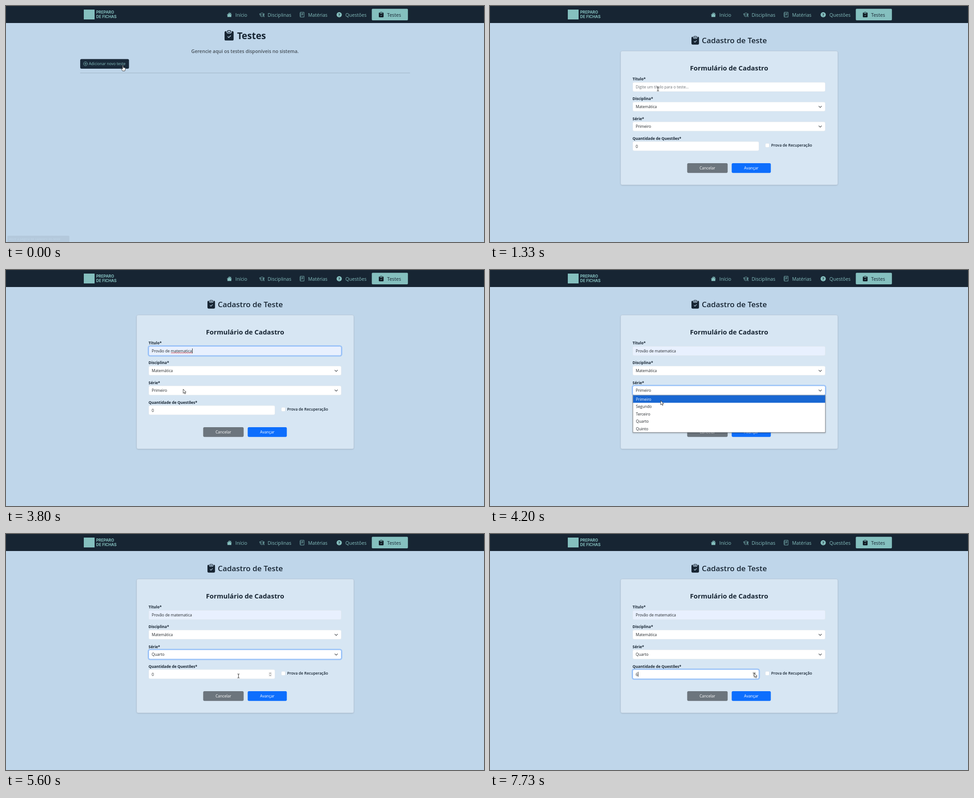
An HTML page that plays this animation: 1063 by 527 pixels, repeating every 8 s.

```html
<!DOCTYPE html>
<html lang="pt">
<head>
<meta charset="utf-8">
<title>Cadastro de Teste</title>
<style>
  html, body { margin: 0; width: 100%; height: 100%; overflow: hidden; background: #bfd6ea; }
  svg { display: block; width: 1063px; height: 527px; }
  text { font-family: 'Open Sans', 'Noto Sans', sans-serif; font-size: 8.57px; fill: #212529; white-space: pre; }
  .mid { text-anchor: middle; }
  .bold { font-weight: 700; fill: #172533; }
  .semi { font-weight: 600; fill: #172533; }
  .label { font-size: 8.42px; }
  .nav { font-size: 10.65px; fill: #85c0bf; }
  .brand { font-family: Inter, sans-serif; font-weight: 700; fill: #85c0bf; }
  .small { font-family: 'Liberation Sans', Arial, sans-serif; font-size: 7.1px; fill: #fff; }
  .light { fill: #fff; }
  .line { fill: none; stroke-linecap: round; stroke-linejoin: round; }
</style>
</head>
<body>
<svg viewBox="0 0 1063 527" xmlns="http://www.w3.org/2000/svg">
  <defs>
    <path id="clipboard" fill-rule="evenodd" d="M6.5 0A1.5 1.5 0 0 0 5 1.5v1A1.5 1.5 0 0 0 6.5 4h3A1.5 1.5 0 0 0 11 2.5v-1A1.5 1.5 0 0 0 9.5 0zM9.5 1a.5.5 0 0 1 .5.5v1a.5.5 0 0 1-.5.5h-3a.5.5 0 0 1-.5-.5v-1a.5.5 0 0 1 .5-.5zM4 1.5H3a2 2 0 0 0-2 2V14a2 2 0 0 0 2 2h10a2 2 0 0 0 2-2V3.5a2 2 0 0 0-2-2h-1v1A2.5 2.5 0 0 1 9.5 5h-3A2.5 2.5 0 0 1 4 2.5zM10.85 8.85l-3 3a.5.5 0 0 1-.7 0l-1.5-1.5a.5.5 0 0 1 .7-.7L7.5 10.8l2.65-2.65a.5.5 0 0 1 .7.7z"/>
    <filter id="shadow" x="-5%" y="-10%" width="110%" height="125%">
      <feDropShadow dx="0" dy="1.2" stdDeviation="1.4" flood-opacity=".28"/>
    </filter>
    <filter id="soft" x="-3%" y="-3%" width="106%" height="106%">
      <feDropShadow dx="0" dy="1" stdDeviation="1" flood-opacity=".14"/>
    </filter>
  </defs>

  <rect width="1063" height="527" fill="#bfd6ea"/>
  <rect width="1063" height="38" fill="#172533"/>
  <rect x="173" y="8" width="24" height="22" fill="#85c0bf"/>
  <text class="brand" x="200.5" y="17" font-size="10.3">PREPARO</text>
  <text class="brand" x="200.5" y="27" font-size="9.5">DE FICHAS</text>

  <g fill="#85c0bf">
    <path transform="translate(491 13.7) scale(.72)" d="M8 .9 15.6 8.5l-.9.8L8 2.6 1.3 9.3l-.9-.8zM11 2h2v5l-2-2zM8 3.6l6 6V15H2V9.6z"/>
    <circle cx="741" cy="19.5" r="5.8"/>
    <rect x="813.5" y="6.3" width="80.3" height="25.8" rx="2"/>
  </g>
  <g class="line" stroke="#85c0bf" stroke-width="1.2">
    <path transform="translate(563 13.8) scale(.74)" d="M8 2.5.8 5.6 8 8.9l7.2-3.3zM3.2 7.2v4L8 13.8l4.8-2.6v-4M14.4 6v6.5M13.5 14l.9-1.5.9 1.5"/>
    <path transform="translate(652.5 13.4) scale(.74)" d="M3 .8h11v14.4H3zM1.4 4.5H4M1.4 8H4M1.4 11.5H4M6.5 4.5H11M6.5 7H11M6.5 9.5H9"/>
  </g>
  <text class="bold mid" x="741" y="22.7" style="font-size:8.5px">?</text>
  <use href="#clipboard" transform="translate(828.4 13.3) scale(.75)" fill="#101a24"/>
  <text class="nav mid" x="523.3" y="23.7">Início</text>
  <text class="nav mid" x="608.2" y="23.7">Disciplinas</text>
  <text class="nav mid" x="693.3" y="23.7">Matérias</text>
  <text class="nav mid" x="778.3" y="23.7">Questões</text>
  <text class="nav mid" x="863" y="23.7" style="fill:#172533">Testes</text>

  <g id="listPage">
    <use href="#clipboard" transform="translate(484.6 54) scale(1.44)" fill="#172533"/>
    <text class="bold mid" x="546" y="74" style="font-size:20.6px">Testes</text>
    <text class="semi mid" x="531.5" y="105" style="font-size:10.55px;fill:#454f58">Gerencie aqui os testes disponíveis no sistema.</text>
    <rect x="165" y="118.5" width="108.5" height="21.5" rx="3" fill="#1a2a3a"/>
    <g class="line" stroke="#85c0bf" stroke-width=".8">
      <circle cx="176.8" cy="129" r="4.4"/>
      <path d="M174.6 129h4.4M176.8 126.8v4.4"/>
    </g>
    <text class="mid" x="225" y="132.3" style="fill:#85c0bf">Adicionar novo teste</text>
    <path d="M165 149.5H898.5" stroke="#a0b4c6"/>
  </g>
  <g id="status">
    <rect x="3" y="513" width="138" height="15" rx="1.5" fill="#3c4348"/>
    <text x="7" y="522.5" style="font-size:7px;fill:#c6d0d6">Abrir a página de cadastro do teste</text>
  </g>

  <g id="formPage">
    <use href="#clipboard" transform="translate(446.8 67) scale(1.2)" fill="#172533"/>
    <text class="semi mid" x="543.3" y="83" style="font-size:16.9px">Cadastro de Teste</text>
    <rect x="290.5" y="100.5" width="483" height="299" rx="3.5" fill="#d7e6f3" stroke="#b5c6d6" stroke-width=".8" filter="url(#soft)"/>
    <text class="bold mid" x="531.7" y="143.5" style="font-size:14.8px">Formulário de Cadastro</text>
    <text class="bold label" x="317" y="166">Título*</text>
    <text class="bold label" x="317" y="210.3">Disciplina*</text>
    <text class="bold label" x="317" y="254.5">Série*</text>
    <text class="bold label" x="317" y="298.7">Quantidade de Questões*</text>
    <g id="fields"></g>
    <text id="title" x="324" y="184"></text>
    <path id="squiggle" class="line" stroke="#e0252b" stroke-width=".9"/>
    <text x="324" y="228">Matemática</text>
    <text id="grade" x="324" y="272"></text>
    <text id="count" x="324" y="316.5"></text>
    <path class="line" d="M731.3 223.6l3 3 3-3M731.3 267.6l3 3 3-3" stroke="#343a40" stroke-width="1.1"/>
    <g id="spinner">
      <rect x="584" y="308" width="7.2" height="10.4" rx=".8" fill="#efefef"/>
      <rect id="spinnerUp" x="584" y="308" width="7.2" height="5.2"/>
      <path class="line" d="M586 311.7l1.6-1.6 1.6 1.6M586 315l1.6 1.6 1.6-1.6" stroke="#505050" stroke-width=".9"/>
    </g>
    <rect x="612.5" y="307" width="8.5" height="8.5" rx="2" fill="#fff" stroke="#dee2e6" stroke-width=".5"/>
    <text class="semi" x="625.3" y="314" style="font-size:8.52px">Prova de Recuperação</text>
    <rect x="438.5" y="351" width="90" height="21.7" rx="3" fill="#6c757d"/>
    <rect x="537.5" y="351" width="87" height="21.7" rx="3" fill="#0d6efd"/>
    <text class="mid light" x="483.3" y="365">Cancelar</text>
    <text class="mid light" x="581" y="365">Avançar</text>
    <rect id="caret" width=".9" height="11" fill="#111"/>

    <g id="popup" filter="url(#shadow)">
      <path d="M378.5 197.5l6-5.5 6 5.5z" fill="#3e4144"/>
      <rect x="373" y="196.7" width="96" height="19.8" rx="2.5" fill="#4e5052"/>
      <text class="small" x="379.8" y="209">Provão de matematica</text>
      <path class="line" d="M457 204.5l4.4 4.4M461.4 204.5l-4.4 4.4" stroke="#ddd" stroke-width=".9"/>
    </g>
    <g id="options"></g>
  </g>

  <g id="cursor">
    <path id="arrow" d="M0 0V9.3L2.2 7.3 3.7 10.7 5.2 10 3.8 6.8H6.5Z" fill="#fff" stroke="#111" stroke-width=".8"/>
    <path id="beam" class="line" d="M-1.8-4.5Q0-4.5 0-3.6Q0-4.5 1.8-4.5M0-3.6V3.6M-1.8 4.5Q0 4.5 0 3.6Q0 4.5 1.8 4.5" stroke="#111" stroke-width=".9"/>
    <path id="hand" d="M-.9.9Q0-.7.9.9V5l4 .9Q5.7 6.2 5.6 7.5L5 10.7 4.2 12.8H-.8L-3.3 9Q-4 7.6-2.7 7.3L-.9 8.7Z" fill="#fff" stroke="#111" stroke-width=".8" stroke-linejoin="round"/>
  </g>
</svg>
<script>
const LOOP = 8000, TICK = 1000 / 15;
const TITLE = 'Provão de matematica';
const GRADES = ['Primeiro', 'Segundo', 'Terceiro', 'Quarto', 'Quinto'];
const ROW = 16.4, LIST_TOP = 280.6;
const CLICKS = [97, 99, 103, 106, 108, 115];

// tick, x, y of the pointer's hot spot
const PATH = [
  [0, 260, 132.2], [3, 267, 122.5], [5, 267, 122.5], [18, 369.5, 176], [20, 373.5, 185.3],
  [26, 373.5, 185.3], [33, 411, 203], [45, 411, 203], [57, 394, 266], [60, 394, 266],
  [67, 357.5, 331.5], [76, 357.5, 331.5], [84, 517, 317], [86, 584.5, 314], [87, 584.5, 314],
  [88, 585.8, 313.8], [92, 585.8, 313.8], [95, 587.5, 310.7]
];
// first tick of each pointer shape
const SHAPES = [[0, 'hand'], [8, 'arrow'], [17, 'beam'], [30, 'arrow'], [80, 'beam'], [86, 'arrow']];

const $ = id => document.getElementById(id);
const clamp = v => Math.max(0, Math.min(1, v));
const show = (id, on) => $(id).style.display = on ? '' : 'none';
const within = (n, from, to) => n >= from && n < to;

const box = (x, y, w, extra) => `<rect x="${x}" y="${y}" width="${w}" height="20.5" rx="3" ${extra}/>`;
const field = (name, y, w) =>
  `<g id="${name}Ring">${box(317.5, y, w, 'fill="none" stroke="#0d6efd" stroke-opacity=".3" stroke-width="4.6"')}</g>` +
  box(317.5, y, w, `id="${name}Box" fill="#fff" stroke="#dee2e6" stroke-width=".5"`) +
  `<g id="${name}Edge">${box(317.5, y, w, 'fill="none" stroke="#94bffb"')}</g>`;

$('fields').innerHTML = field('title', 170.5, 428) + field('subject', 214.5, 428) +
  field('grade', 258.7, 428) + field('count', 302.8, 280.5);

$('options').innerHTML =
  '<rect x="317.8" y="279.8" width="428" height="83" fill="#fff" stroke="#6f7479" stroke-width=".9" filter="url(#shadow)"/>' +
  `<rect id="mark" x="318.2" width="427.2" height="${ROW}" fill="#1967d2"/>` +
  GRADES.map((g, i) => `<text id="option${i}" x="324.5" y="${LIST_TOP + ROW * i + 11.3}">${g}</text>`).join('');

let wave = 'M367.5 186';
for (let i = 0; i < 23; i++) wave += `l2 ${i % 2 ? 1.6 : -1.6}`;
$('squiggle').setAttribute('d', wave);

function pointerAt(n) {
  const next = PATH.findIndex(p => p[0] > n);
  if (next < 0) return PATH[PATH.length - 1].slice(1);
  const [t0, x0, y0] = PATH[next - 1], [t1, x1, y1] = PATH[next];
  const k = (n - t0) / (t1 - t0);
  const e = k * k * (3 - 2 * k);
  return [x0 + (x1 - x0) * e, y0 + (y1 - y0) * e];
}

function focus(name, n, from, to) {
  const level = n < to ? clamp((n - from + 1) / 3) : clamp(1 - (n - to + 1) / 3);
  $(name + 'Ring').style.opacity = $(name + 'Edge').style.opacity = level;
}

function setCaret(x, y, on) {
  show('caret', on);
  $('caret').setAttribute('x', x);
  $('caret').setAttribute('y', y);
}

function draw(ms) {
  const n = Math.floor((ms + 5) / TICK);
  const [x, y] = pointerAt(n);
  const shape = SHAPES.filter(s => s[0] <= n).pop()[1];
  $('cursor').setAttribute('transform', `translate(${x} ${y})`);
  for (const s of ['arrow', 'beam', 'hand']) show(s, s === shape);

  show('listPage', n < 8);
  show('formPage', n >= 8);
  show('status', n < 9);
  $('status').style.opacity = clamp(.08 + n * .31);

  focus('title', n, 22, 59);
  focus('subject', n, Infinity, Infinity);
  focus('grade', n, 59, 97);
  focus('count', n, 97, Infinity);

  const filled = n >= 30;
  $('title').textContent = filled ? TITLE : 'Digite um título para o teste...';
  $('title').style.fill = filled ? '#212529' : '#6a7076';
  $('titleBox').setAttribute('fill', filled ? '#e8f0fe' : '#fff');
  show('squiggle', within(n, 46, 59));
  show('popup', within(n, 23, 41));
  $('popup').style.opacity = n < 38 ? clamp((n - 22) / 2) : clamp((41 - n) / 3);

  const open = within(n, 60, 71);
  const row = Math.max(0, Math.min(4, Math.floor((y - LIST_TOP) / ROW)));
  show('options', open);
  $('mark').setAttribute('y', LIST_TOP + ROW * row - .5);
  GRADES.forEach((_, i) => $('option' + i).style.fill = i === row ? '#fff' : '#212529');
  $('grade').textContent = GRADES[n < 71 ? 0 : 3];

  $('count').textContent = CLICKS.filter(c => c <= n).length;
  show('spinner', n >= 80);
  show('spinnerUp', n >= 94);
  $('spinnerUp').setAttribute('fill', CLICKS.includes(n) ? '#b4b4b4' : '#d2d2d2');

  if (n >= 97) setCaret(328.9, 307.7, true);
  else if (n >= 38) setCaret(414, 175.2, n < 59 && !within(n, 46, 53));
  else setCaret(324.5, 175.2, n >= 22);
}

const start = performance.now();
function loop() {
  draw((performance.now() - start) % LOOP);
  requestAnimationFrame(loop);
}
loop();
</script>
</body>
</html>
```
